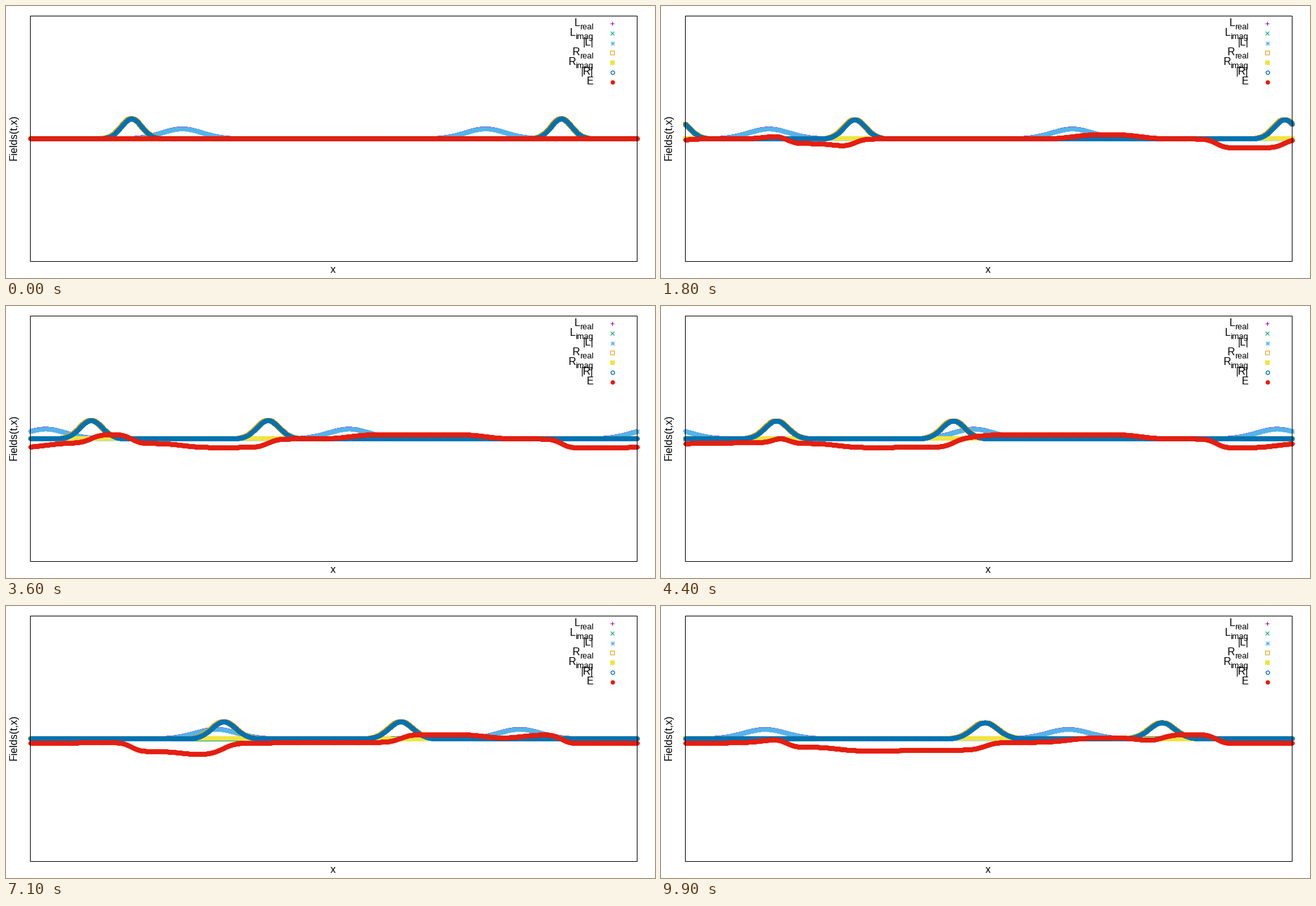
A matplotlib script for the animation above (10000 ms loop, 1000 by 420 pixels).

```python
import numpy as np
import matplotlib.pyplot as plt
from matplotlib.animation import FuncAnimation
from matplotlib.patches import Rectangle
from matplotlib.path import Path

W, H, DPI = 1000, 420, 100
PT = 72 / DPI                  # points per pixel
LEFT, TOP, SPAN, TALL = 37, 15, 935, 379
FRAMES, SUB, CELLS = 100, 12, 1920   # a pulse moves one cell per substep
DX = SPAN / CELLS
SIGMA, PEAK = 15.6, 31.0       # width and height of a right-moving pulse
SPREAD = 0.54 / 99             # relative growth of the variance per frame
GAIN = 14 / (PEAK**2 * SIGMA * np.sqrt(np.pi))
PHASE = 1.5e-6

xs = np.arange(CELLS) * DX


def pulses(starts, shift, sigma, peak, n):
    """Periodic spreading Gaussians, moved by shift pixels."""
    s2 = sigma**2 + SIGMA**2 * SPREAD * n
    total = np.zeros(CELLS)
    for frac in starts:
        d = (xs - frac * SPAN - shift + SPAN / 2) % SPAN - SPAN / 2
        total += peak * sigma / np.sqrt(s2) * np.exp(-d**2 / (2 * s2))
    return total


def simulate():
    dt = 1 / SUB
    efield, gauge, phase_l, phase_r = np.zeros((4, CELLS))
    states = []
    for k in range(FRAMES * SUB):
        n = k * dt
        left = pulses((1 / 4, 3 / 4), -k * DX, 2 * SIGMA, PEAK / 2, n)
        right = pulses((1 / 6, 7 / 8), k * DX, SIGMA, PEAK, n)
        if k % SUB == 0:
            states.append((left * np.cos(phase_l), left * np.sin(phase_l), left,
                           right * np.cos(phase_r), right * np.sin(phase_r), right,
                           efield.copy()))
        efield += GAIN * (left**2 - right**2) * DX
        gauge -= efield * dt
        phase_l = np.roll(phase_l - PHASE * gauge * dt, -1)
        phase_r = np.roll(phase_r + PHASE * gauge * dt, 1)
    return states


fig = plt.figure(figsize=(W / DPI, H / DPI), dpi=DPI, facecolor="white")
ax = fig.add_axes([0, 0, 1, 1])
ax.set_xlim(0, W)
ax.set_ylim(H, 0)
ax.axis("off")


def text(x, y, s, size=16, **kw):
    return ax.text(x, y, s, fontsize=size * PT, family="Liberation Sans",
                   va="baseline", **kw)


def label(y, head, sub="", width=0.0):
    """Right-aligned legend entry; width is the advance of the subscript."""
    text(905 - width, y, head, ha="right")
    if sub:
        text(905, y + 5, sub, 12.8, ha="right")


def centred(path, r):
    """Scale a unit path to r pixels and put it on the middle of a pixel."""
    return Path(path.vertices * r + (0.5, -0.5), path.codes), 2 * r + 1


spokes = Path([(-1, 0), (1, 0), (0, -1), (0, 1), (-1, -1), (1, 1), (-1, 1), (1, -1)],
              [Path.MOVETO, Path.LINETO] * 4)
star = centred(spokes, 3)
disc = centred(Path.unit_circle(), 2.75)

SERIES = [  # head, subscript, its width, colour, (marker, size), edge, fill
    ("L", "real", 20.7, "#9400d3", ("+", 6), 1, None),
    ("L", "imag", 27, "#009e73", ("x", 6), 1, None),
    ("|L|", "", 0, "#56b4e9", star, 1, None),
    ("R", "real", 20.7, "#e69f00", ("s", 6), 1, "none"),
    ("R", "imag", 27, "#f0e442", ("s", 6), 1, "#f0e442"),
    ("|R|", "", 0, "#0072b2", disc, 1.3, "none"),
    ("E", "", 0, "#e51e10", disc, 1.3, "#e51e10"),
]

px = np.append(np.floor(LEFT + 0.5 + np.append(xs, SPAN)), 934)
lines = []
for i, (head, sub, width, color, (marker, size), edge, fill) in enumerate(SERIES):
    line, = ax.plot([], [], ls="none", marker=marker, ms=size * PT, mew=edge * PT,
                    mec=color, mfc=fill or color, antialiased=False, zorder=2 + i)
    lines.append(line)
    label(30.6 + 15 * i, head, sub, width)

ax.add_patch(Rectangle((LEFT, TOP), SPAN, TALL, fill=False, ec="black",
                       lw=PT, zorder=20))
text(504, 411.5, "x", ha="center")
text(17, 203, "Fields(t,x)", ha="center", rotation=90, rotation_mode="anchor")

states = simulate()


def draw(n):
    for i, (line, values) in enumerate(zip(lines, states[n])):
        rows = np.floor(204.97 - np.append(values, values[0]))
        line.set_data(px, np.append(rows, 27 + 15 * i))
    return lines


anim = FuncAnimation(fig, draw, frames=FRAMES, interval=100, repeat=True,
                     repeat_delay=0, init_func=lambda: draw(0))
plt.show()
```
